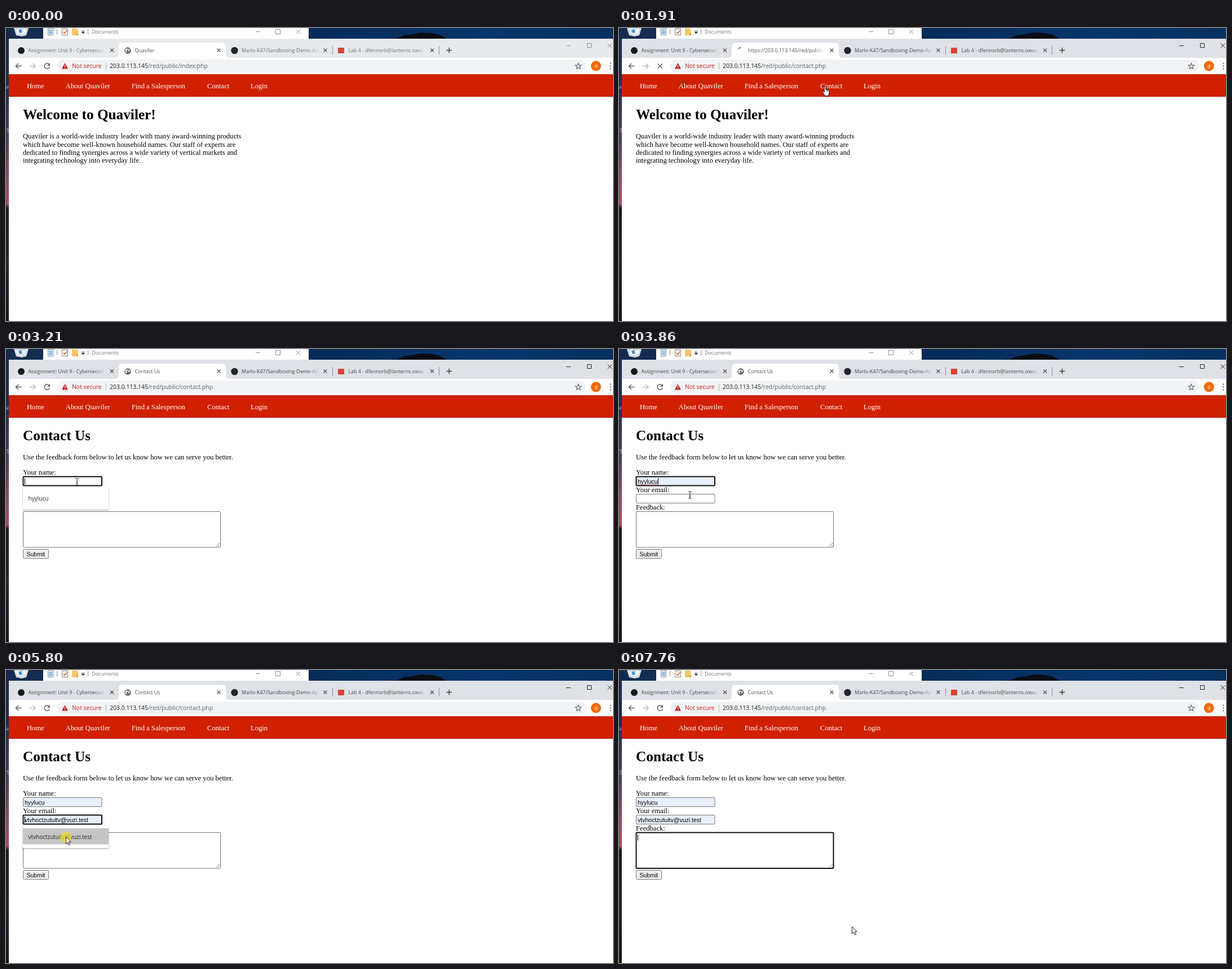
An HTML page that plays this animation: 1077 px wide and 520 px high, repeating every 8 s.

```html
<!DOCTYPE html>
<html lang="en">
<head>
<meta charset="utf-8">
<title>Contact form demo</title>
<style>
  html, body { margin: 0; width: 100%; height: 100%; overflow: hidden; background: #fff; }
  svg { display: block; width: 100%; height: 100%; --strip: #e7eaed; --tab: #6b6f73; --btn: #8d9094; }
  svg.active { --strip: #dee1e6; --tab: #45494d; --btn: #222; }
  text { white-space: pre; }
  .ui { font: 8.9px "Open Sans", "Noto Sans", sans-serif; }
  .url { font: 10.45px "Open Sans", "Noto Sans", sans-serif; }
  .page { font: 12.64px "Liberation Serif", serif; }
  .form { font: 10.53px "Liberation Sans", Arial, sans-serif; }
  .h1 { font: bold 25.28px "Liberation Serif", serif; }
  .strip { fill: var(--strip); }
  .tab { fill: var(--tab); }
  .line { fill: none; stroke: #5f6368; }
  .btn { fill: none; stroke: var(--btn); }
  .box { fill: #fff; stroke: #767676; }
</style>
</head>
<body>
<svg id="stage" viewBox="0 0 1077 520" preserveAspectRatio="none">
  <defs>
    <linearGradient id="sky">
      <stop offset="0" stop-color="#05264f"/><stop offset=".5" stop-color="#052b58"/>
      <stop offset=".8" stop-color="#07366d"/><stop offset="1" stop-color="#06305f"/>
    </linearGradient>
    <linearGradient id="edge" x2="0" y2="1">
      <stop offset="0" stop-color="#14284c"/><stop offset=".2" stop-color="#252c50"/>
      <stop offset=".38" stop-color="#4d3c5a"/><stop offset=".5" stop-color="#8c4a5f"/>
      <stop offset=".6" stop-color="#a94c5a"/><stop offset=".615" stop-color="#1b1c22"/>
      <stop offset=".8" stop-color="#25282a"/><stop offset="1" stop-color="#17180f"/>
    </linearGradient>
    <linearGradient id="fade">
      <stop offset="0" style="stop-color:var(--strip);stop-opacity:0"/>
      <stop offset="1" style="stop-color:var(--strip)"/>
    </linearGradient>
    <linearGradient id="fadeWhite">
      <stop offset="0" stop-color="#fff" stop-opacity="0"/><stop offset="1" stop-color="#fff"/>
    </linearGradient>
    <filter id="soft" x="-10%" y="-20%" width="120%" height="150%">
      <feDropShadow dx="0" dy="1" stdDeviation="1.2" flood-opacity=".4"/>
    </filter>
    <path id="close" d="M-3-3 3 3M3-3-3 3" fill="none" stroke="#4c5054" stroke-width="1.2"/>
  </defs>

  <!-- desktop -->
  <rect width="1077" height="20" fill="url(#sky)"/>
  <path d="M664 20 694 18 705 13 722 11 735 8 755 9 770 12 783 20Z" fill="#090c14"/>
  <rect width="66" height="20" fill="#152c51"/>
  <rect width="5" height="520" fill="url(#edge)"/>
  <path d="M14 0H40L36 13 28 15 18 13Z" fill="#d8dde2"/>
  <path d="M18 2 27 4 36 1 34 9 25 11 20 8Z" fill="#f6f8fa"/>
  <path d="M22 4 27 2 29 8 24 9Z" fill="#3d8ed4"/>
  <g class="ui" fill="#d5d8e0"><text x="-1" y="107">u</text><text x="1" y="185">S</text></g>

  <!-- file window -->
  <rect x="66" width="471" height="20" fill="#fff"/>
  <path d="M74.5 .5H83.5V12.5H74.5Z" fill="#fff" stroke="#72889b"/>
  <path d="M76 4H82M76 7H82M76 9.5H82" stroke="#3f8fce" stroke-width="1.5"/>
  <path d="M90.5 2V11M145.5 2V11" stroke="#8a8a8a"/>
  <path d="M99.5 1.5H109.5V12.5H99.5Z" fill="#fff" stroke="#8a8178"/>
  <path d="M101.5 7 104 9.5 108.5 4" fill="none" stroke="#d9572f" stroke-width="1.5"/>
  <path d="M117 1H126L128 4V13H117Z" fill="#f5c668"/><path d="M125 9H128V13H125Z" fill="#e0a23c"/>
  <path d="M134 7H139.5L136.8 10ZM134 5H139.5" fill="#333" stroke="#333" stroke-width=".7"/>
  <text class="ui" x="152" y="10" fill="#777">Documents</text>
  <path d="M443 6.5H451M478.500 2.500H486.500V10.500H478.500ZM515 3 522 10M522 3 515 10" fill="none" stroke="#8b8b8b"/>

  <!-- browser -->
  <rect x="5" y="20" width="1072" height="500" fill="#fff"/>
  <rect class="strip" x="5" y="19" width="1072" height="34"/>
  <path d="M193 53Q200 53 200 46V33Q200 26 207 26H383Q390 26 390 33V46Q390 53 397 53Z" fill="#fff"/>
  <circle cx="27" cy="40" r="6" fill="#15191d"/>
  <circle cx="405.5" cy="40" r="6.2" fill="#22262a"/>
  <rect x="589" y="35" width="11" height="10" fill="#d94436"/>
  <g class="ui tab">
    <text x="39.5" y="43">Assignment: Unit 9 - Cybersecuri</text>
    <text x="418" y="43">Marlo-K47/Sandboxing-Demo-Appli</text>
    <text x="607.5" y="43">Lab 4 - dfennorb@lanterns.oxvu</text>
  </g>
  <g id="tabFades"></g>
  <text class="ui" id="tabTitle" x="228.5" y="43" fill="#4b4f53"></text>
  <rect x="346" y="30" width="20" height="20" fill="url(#fadeWhite)"/>
  <rect x="366" y="30" width="22" height="20" fill="#fff"/>
  <g id="globe">
    <circle cx="216" cy="40" r="5.7" fill="#5f6368"/>
    <path d="M212 37 215 36 217 38 214 40 215 43 213 43 211.5 40ZM218 36 220 38 219 41 217 42 217 39Z" fill="#e8eaed"/>
  </g>
  <path id="spinner" d="M211.5 37.5Q213 35 216 34.5" class="line" stroke-width="1.3"/>
  <g id="closers"></g>
  <path d="M579.5 32V47M768.5 32V47" stroke="#8d9196"/>
  <path d="M781.5 39.5H791M786.3 34.8V44.3" fill="none" stroke="#3c4043" stroke-width="1.5"/>
  <path class="btn" d="M994 31.5H1002M1031.5 27.5H1038.5V34.5H1031.5ZM1067.5 27.5 1075 35M1075 27.5 1067.5 35"/>

  <path d="M27.5 67.5H17.5M22 63 17.5 67.5 22 72" class="line" stroke-width="1.5"/>
  <path d="M42 67.5H52M47.5 63 52 67.5 47.5 72" fill="none" stroke="#b9bcc0" stroke-width="1.5"/>
  <g id="reload">
    <path d="M76.3 64.2A4.7 4.7 0 1 0 77.3 69" class="line" stroke-width="1.5"/>
    <path d="M78 62V67H73Z" fill="#5f6368"/>
  </g>
  <path id="stop" d="M69 63.5 77 71.5M77 63.5 69 71.5" class="line" stroke-width="1.5"/>
  <rect x="91" y="56" width="938" height="22.5" rx="11.25" fill="#f1f3f4"/>
  <path d="M104.5 62 110 72.5H99Z" fill="#c5221f"/>
  <path d="M104.5 65.5V69M104.5 70V71.2" stroke="#fff" stroke-width="1.1"/>
  <text class="url" x="117" y="71" fill="#c5221f">Not secure</text>
  <path d="M177.5 61V74" stroke="#b4b7bb"/>
  <text class="url" x="184" y="71" fill="#202124">203.0.113.145<tspan id="path" fill="#5f6368"></tspan></text>
  <path id="star" class="line" stroke-width="1.1"/>
  <circle cx="1046.8" cy="67.3" r="9" fill="#f36a0a"/>
  <text class="ui" x="1046.8" y="70.5" text-anchor="middle" fill="#fff">d</text>
  <path d="M1071.5 62.5H1073.5M1071.5 67.5H1073.5M1071.5 72.5H1073.5" stroke="#5f6368" stroke-width="2"/>

  <!-- page -->
  <rect x="5" y="82" width="1072" height="40" fill="#d02000"/>
  <path d="M5 121.5H1077" stroke="#ad1c02"/>
  <g class="page" fill="#fff">
    <text x="37" y="107">Home</text><text x="105.8" y="107">About Quaviler</text>
    <text x="222.8" y="107">Find a Salesperson</text><text x="357" y="107">Contact</text>
    <text x="434" y="107">Login</text>
  </g>
  <g id="home" class="page">
    <text class="h1" x="30" y="162">Welcome to Quaviler!</text>
    <text x="30" y="196.3">Quaviler is a world-wide industry leader with many award-winning products</text>
    <text x="30" y="210.5">which have become well-known household names. Our staff of experts are</text>
    <text x="30" y="224.8">dedicated to finding synergies across a wide variety of vertical markets and</text>
    <text x="30" y="239">integrating technology into everyday life.</text>
  </g>
  <g id="contact" class="page">
    <text class="h1" x="30" y="162">Contact Us</text>
    <text x="30" y="196.3">Use the feedback form below to let us know how we can serve you better.</text>
    <text x="30" y="223">Your name:</text>
    <text x="30" y="254">Your email:</text>
    <text x="30" y="285">Feedback:</text>
    <rect id="nameBox" class="box" x="30.5" y="226.5" width="139.5" height="16" rx="1.5"/>
    <rect id="emailBox" class="box" x="30.5" y="257.5" width="139.5" height="16" rx="1.5"/>
    <rect id="noteBox" class="box" x="30.5" y="288.5" width="350" height="63.5" rx="1.5"/>
    <path d="M373 350.5 379.5 344M377 350.5 379.5 348" stroke="#777"/>
    <rect x="30.5" y="355.5" width="45" height="16" rx="2" fill="#efefef" stroke="#767676"/>
    <g class="form">
      <text id="nameText" x="33" y="238.5"></text>
      <text id="emailText" x="33" y="269.5"></text>
      <text x="36.5" y="367.5">Submit</text>
    </g>
    <path id="squiggle" d="M33 240.5H69" stroke="#e0443a" stroke-dasharray="1.5 1"/>
    <path id="caret" stroke="#000"/>
    <g id="popup">
      <rect x="30" y="276" width="152" height="40" fill="#fff" filter="url(#soft)"/>
      <rect id="hover" x="30" y="281" width="152" height="28.5" fill="#c6c6c6"/>
      <text id="hint" class="ui" x="39.5" y="299.5" style="font-size:10px" fill="#222"></text>
    </g>
  </g>

  <g id="menu" class="ui" style="font-size:9px">
    <path d="M362 119H560.5V310.5H362Z" fill="#8a8a8a"/>
    <rect x="357.5" y="114.5" width="201.5" height="194.5" fill="#fff" stroke="#c4c4c4"/>
    <path d="M358 179.5H558M358 264H558" stroke="#dcdcdc"/>
  </g>

  <circle id="click" cx="106.5" cy="297" r="10" fill="#e8d92c" opacity=".75"/>
  <g id="arrow">
    <path d="M.5 .5V13L3.4 10.2 5.5 15 7.5 14.1 5.4 9.5H9.2Z" fill="#fff" stroke="#111" stroke-width=".9"/>
  </g>
  <g id="hand">
    <path d="M3.2 1.6Q4.5-.2 5.8 1.6V6L11 7.3Q12.4 7.800 12.200 10L11 17.500H4.800L.8 12Q-.2 9.500 1.500 9.500L3.200 11Z" fill="#fff" stroke="#111"/>
    <path d="M7.8 7V10M10 7.800V10" stroke="#111" stroke-width=".7"/>
  </g>
  <g id="beam">
    <path d="M-3-6H-1L0-5 1-6H3M0-5V5M-3 6H-1L0 5 1 6H3M-1.5 2H1.5" fill="none" stroke="#222"/>
  </g>
</svg>
<script>
const $ = id => document.getElementById(id);
const NAME = "hyylucu", EMAIL = "vtvhoctzutuitv@vuzi.test", LOOP = 8000;

// Fixed parts built from short rules
$("closers").innerHTML = [188, 377.5, 566.5, 756].map(x => `<use href="#close" x="${x}" y="39.5"/>`).join("");
$("tabFades").innerHTML = [178, 556, 750].map(x =>
  `<rect x="${x - 20}" y="30" width="20" height="20" fill="url(#fade)"/>
   <rect class="strip" x="${x}" y="30" width="20" height="20"/>`).join("");
$("star").setAttribute("d", "M" + Array.from({ length: 10 }, (_, i) => {
  const a = i * Math.PI / 5, r = i % 2 ? 2.4 : 5.6;
  return `${(1015.5 + r * Math.sin(a)).toFixed(2)} ${(67.8 - r * Math.cos(a)).toFixed(2)}`;
}).join("L") + "Z");
$("menu").innerHTML += [
  [131, "Back", "Alt+Left Arrow"], [150, "Forward", "Alt+Right Arrow"], [169, "Reload", "Ctrl+R"],
  [197, "Save as...", "Ctrl+S"], [216, "Print...", "Ctrl+P"], [235, "Cast...", ""],
  [254, "Translate to English", ""], [282, "View page source", "Ctrl+U"], [301, "Inspect", "Ctrl+Shift+I"]
].map(([y, label, keys]) =>
  `<text x="377" y="${y}" fill="${label === "Forward" ? "#777" : "#1c1c1c"}">${label}</text>
   <text x="539.5" y="${y}" text-anchor="end" fill="#5a5a5a">${keys}</text>`).join("");

// Each step changes only the listed properties
const steps = [
  [0, { title: "Quaviler", path: "index" }],
  [200, { cursor: ["beam", 368, 208.5] }],
  [630, { active: true, menu: true, cursor: ["arrow", 359, 112] }],
  [1260, { cursor: ["hand", 361, 103] }],
  [1910, { menu: false, loading: true, title: "https://203.0.113.145/red/public/", path: "contact" }],
  [2560, { loading: false, title: "Contact Us", contact: true, cursor: ["beam", 204.5, 195.5] }],
  [3210, { focus: "name", caret: [33.5, 235], popup: -31, hint: NAME, cursor: ["beam", 126, 235.5] }],
  [3860, { name: NAME, caret: [69.5, 235], popup: null, cursor: ["beam", 126, 259] }],
  [4510, { focus: "email", caret: [33.5, 265.5], popup: 0, hint: EMAIL }],
  [5170, { caret: null, cursor: ["arrow", 105, 279.5] }],
  [5800, { email: EMAIL, caret: [33.5, 265.5], hover: true, click: true, cursor: ["arrow", 106, 295.5] }],
  [7110, { focus: "note", caret: [33.5, 297], popup: null, hover: false, click: false, cursor: ["beam", 107.5, 300.5] }],
  [7760, { cursor: ["arrow", 413, 455] }]
];

const show = (id, on) => $(id).setAttribute("visibility", on ? "visible" : "hidden");
const display = (id, on) => { $(id).style.display = on ? "" : "none"; };
const move = (id, x, y) => $(id).setAttribute("transform", `translate(${x} ${y})`);

function drawField(id, focused, filled) {
  const s = $(id + "Box").style;
  s.stroke = focused ? "#101010" : "#767676";
  s.strokeWidth = focused ? 2 : 1;
  s.fill = filled ? "#e8f0fe" : "#fff";
}

function render(t) {
  const s = Object.assign({ popup: null }, ...steps.filter(([at]) => at <= t).map(step => step[1]));
  $("stage").classList.toggle("active", !!s.active);
  $("tabTitle").textContent = s.title;
  $("path").textContent = `/red/public/${s.path}.php`;
  show("globe", !s.loading);
  show("reload", !s.loading);
  show("spinner", s.loading);
  show("stop", s.loading);
  display("home", !s.contact);
  display("contact", s.contact);
  display("menu", s.menu);

  for (const id of ["name", "email", "note"]) drawField(id, s.focus === id, s[id]);
  $("nameText").textContent = s.name || "";
  $("emailText").textContent = s.email || "";
  show("squiggle", s.name && s.focus === "name");
  show("caret", s.caret);
  if (s.caret) $("caret").setAttribute("d", `M${s.caret[0]} ${s.caret[1] - 5.5}v11`);

  display("popup", s.popup !== null);
  if (s.popup !== null) move("popup", 0, s.popup);
  $("hint").textContent = s.hint || "";
  display("hover", s.hover);
  show("click", s.click);

  const [kind, x, y] = s.cursor || [];
  for (const id of ["arrow", "hand", "beam"]) show(id, id === kind);
  if (kind) move(kind, x, y);
}

const start = performance.now();
function tick() {
  render((performance.now() - start) % LOOP);
  requestAnimationFrame(tick);
}
tick();
</script>
</body>
</html>
```
